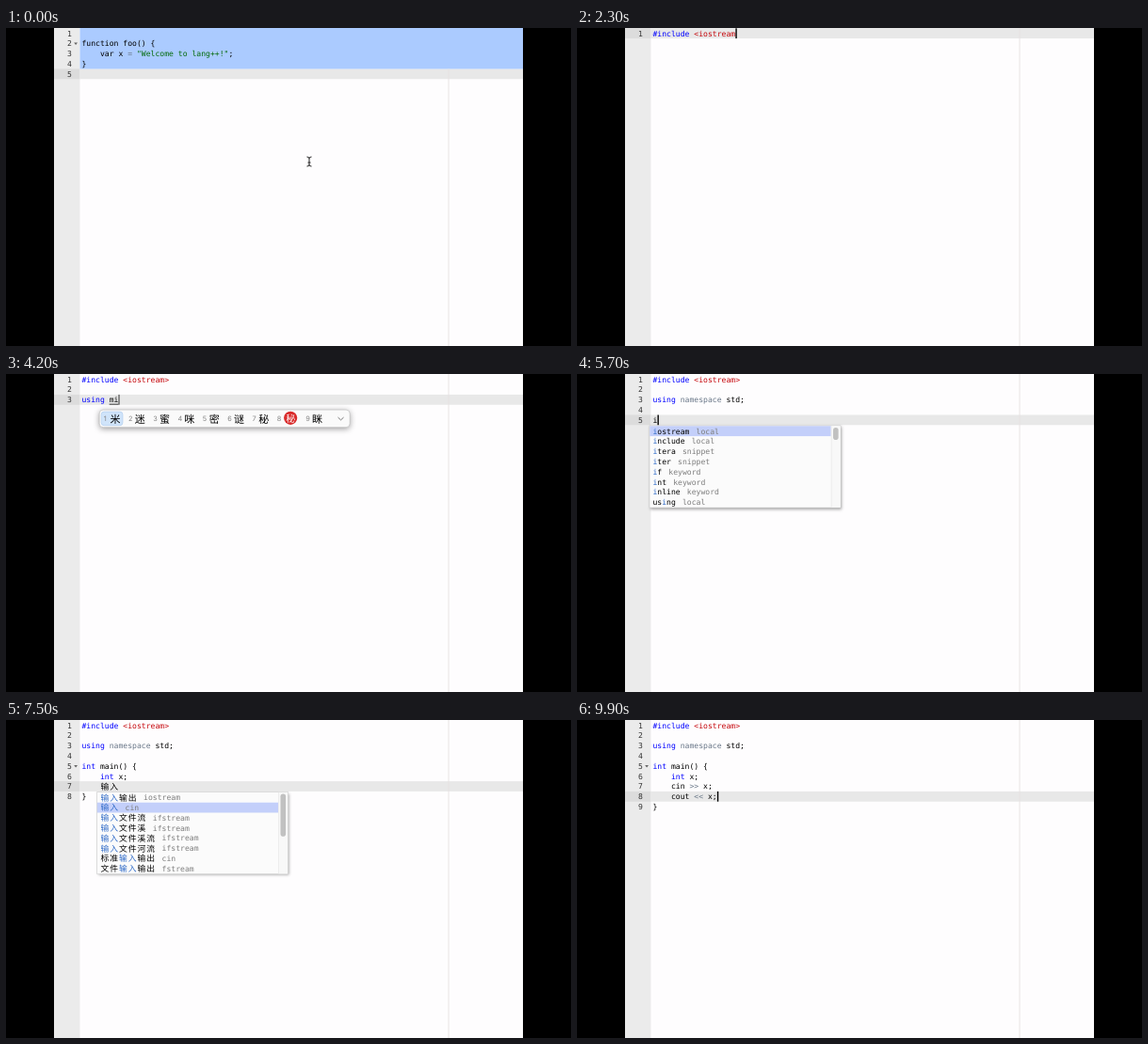
These frames come from a looping animation (600x338 px, 10 s). An HTML page with a canvas:

```html
<!DOCTYPE html>
<html lang="zh-Hans">
<head>
<meta charset="utf-8">
<style>
html, body { margin: 0; width: 100%; height: 100%; overflow: hidden; background: #000; }
canvas { display: block; }
</style>
</head>
<body>
<canvas id="stage" width="600" height="338"></canvas>
<script>
const ctx = document.getElementById('stage').getContext('2d');
const LOOP = 10000, LINE = 10.8, COL = 4.876, LEFT = 80.4, TOP = 0.3;
const MONO = '8.1px "DejaVu Sans Mono", monospace';
const cjk = size => `${size}px "Noto Sans CJK SC", "Noto Sans CJK", sans-serif`;
const BLUE = '#0000ff', GREY = '#687687';

// Later rules win where they overlap.
const syntax = [
  [/#include|\b(using|int)\b/g, BLUE],
  [/\bnamespace\b|=|>>|<</g, GREY],
  [/(?<=^#include )<[^<]*$/g, '#c5060b'],
  [/"[^"]*"/g, '#036a07'],
];

// Input method candidates by pinyin; the longest matching prefix is used.
const candidates = {
  'b': '不 吧 把 被 本 边 并 比 报',
  'bao': '包 报 抱 保 宝 爆 饱 暴 薄',
  'bao han': '包含 饱含 包 报 抱 保 宝',
  'biao zhun': '标准 表准 标注 表转 标转 表追 表尊 标追 表',
  'm': '吗 没 们 面 买 慢 每 忙 门',
  'mi': '米 迷 蜜 咪 密 谜 秘 ㊙ 眯',
  'ming': '名 明 命 鸣 铭 茗 冥 鸣 溟',
  'ming ming': '命名 明明 冥冥 名 明 命 鸣',
  's': '是 说 上 时 所 使 三 谁 水',
  'shi': '是 时 事 使 十 式 市 师 石',
  'shi yo': '使用 实用 试用 适用 是 时',
  'shu': '书 数 树 输 属 熟 叔 术 鼠',
  'shu r': '输入 数日 书 数 树 输 属',
  'shu chu': '输出 书 数 树 输 属 熟',
};

const lists = {
  include: ['包含 #include', '包含 include'],
  stream: ['输入输出 iostream', '输入文件流 ifstream', '输入文件溪 ifstream', '输入文件溪流 ifstream',
    '输入文件河流 ifstream', '标准输入输出 cstdio'],
  using: ['使用 using'],
  namespace: ['命名空间 namespace', '命名 using', '未命名 local', '重命名 rename', '命名管道 mkfifo', '类型命名 typename'],
  std: ['标准 std', '标准输出 cout', '标准输入 cin', '标准错误 cerr', '标准日志 clog', '标准输入输出 cstdio',
    '标准库 cstdlib', '标准异常 exception'],
  i: ['iostream local', 'include local', 'itera snippet', 'iter snippet', 'if keyword', 'int keyword',
    'inline keyword', 'using local'],
  input: ['输入输出 iostream', '输入 cin', '输入文件流 ifstream', '输入文件溪 ifstream', '输入文件溪流 ifstream',
    '输入文件河流 ifstream', '标准输入输出 cin', '文件输入输出 fstream'],
  output: ['输出 cout', '输出文件流 ofstream', '输出文件溪 ofstream', '输出文件溪流 ofstream',
    '输出文件河流 ofstream', '输入输出 iostream', '标准输出 cout', '控制台输出 cout'],
  x: ['x local', 'xor keyword', 'xor_eq keyword', 'extern keyword', 'explicit keyword', 'export keyword',
    'exp function', 'max function'],
};

const steps = [];
let head = '', tail = '';
const at = (t, text, extra) => steps.push({ t, head: head + text, tail, pinyin: '', ...extra });
const keep = (t, text) => { at(t, text); head += text; };
const compose = (t, typed) => typed.split('/').forEach((pinyin, i) => at(t + 100 * i, '', { pinyin }));
const suggest = (t, text, query, list, total = 8, extra) => at(t, text, { query, list: lists[list], total, ...extra });

head = '\nfunction foo() {\n    var x = "Welcome to lang++!";\n}\n';
at(0, '', { selected: true, blink: true });
head = '';
at(100, '');
compose(300, 'b/ba/bao/bao h/bao ha/bao han');
suggest(900, '包含', '包含', 'include');
keep(1200, '#include');
keep(1300, ' ');
keep(1400, '<');
compose(1500, 's/sh/shu/shu r/shu ru');
suggest(2000, '输入', '输入', 'stream');
keep(2300, 'iostream');
keep(2400, '>');
keep(2500, '\n');
keep(2600, '\n');
compose(2800, 's/sh/shi/shi y/shi yo/shi yon/shi yong');
suggest(3600, '使用', '使用', 'using');
keep(3800, 'using');
keep(3900, ' ');
compose(4100, 'm/mi/ming/ming ming');
suggest(4500, '命名', '命名', 'namespace');
keep(4700, 'namespace');
keep(4800, ' ');
compose(4900, 'b/biao zhun');
suggest(5100, '标准', '标准', 'std', 14);
keep(5200, 'std;');
keep(5400, '\n');
keep(5500, '\n');
at(5600, 'i');
suggest(5700, 'i', 'i', 'i', 52);
at(5800, 'in');
keep(5900, 'int');
keep(6000, ' ');
keep(6100, 'ma');
keep(6200, 'in');
keep(6300, '()');
tail = '}';
keep(6400, ' {');
tail = '\n}';
keep(6500, '\n    ');
suggest(6600, 'i', 'i', 'i', 52);
keep(6700, 'int x;');
keep(6800, '\n    ');
compose(7000, 's/shu/shu r/shu ru');
suggest(7400, '输入', '输入', 'input', 15);
suggest(7500, '输入', '输入', 'input', 15, { picked: 1, blink: true });
suggest(7600, '输入', '输入', 'input', 15, { picked: 1 });
keep(7700, 'cin');
keep(7800, ' >');
keep(7900, '> ');
suggest(8000, 'x', 'x', 'x', 24);
keep(8100, 'x;');
keep(8300, '\n    ');
compose(8600, 'shu/shu chu');
suggest(8800, '输出', '输出', 'output', 14);
keep(9000, 'cout');
keep(9200, ' <');
keep(9300, '< ');
suggest(9500, 'x', 'x', 'x', 24);
keep(9700, 'x;');

const rect = (x, y, w, h, color) => { ctx.fillStyle = color; ctx.fillRect(x, y, w, h); };
const isWide = ch => ch > '\u2e80';
const textWidth = s => [...s].reduce((w, ch) => w + (isWide(ch) ? 2 : 1) * COL, 0);

function drawText(text, x, cy, colorAt) {
  [...text].forEach((ch, i) => {
    const wide = isWide(ch);
    ctx.font = wide ? cjk(8.8) : MONO;
    ctx.fillStyle = colorAt(i);
    ctx.fillText(ch, x + (wide ? 0.5 : 0), cy + (wide ? 3.3 : 2.9));
    x += wide ? 2 * COL : COL;
  });
}

function roundBox(x, y, w, h, r, fill, stroke) {
  ctx.beginPath();
  ctx.roundRect(x, y, w, h, r);
  ctx.fillStyle = fill;
  ctx.fill();
  if (!stroke) return;
  ctx.shadowColor = 'transparent';
  ctx.strokeStyle = stroke;
  ctx.lineWidth = 0.6;
  ctx.stroke();
}

function withShadow(color, blur, dx, dy, draw) {
  ctx.save();
  Object.assign(ctx, { shadowColor: color, shadowBlur: blur, shadowOffsetX: dx, shadowOffsetY: dy });
  draw();
  ctx.restore();
}

function drawLine(text, row) {
  const cy = TOP + row * LINE + LINE / 2;
  const colors = Array(text.length).fill('#000');
  for (const [rule, color] of syntax)
    for (const m of text.matchAll(rule)) colors.fill(color, m.index, m.index + m[0].length);
  drawText(text, LEFT, cy, i => colors[i]);
  const number = String(row + 1);
  drawText(number, 70 - textWidth(number), cy, () => '#333');
  if (!text.endsWith('{')) return;
  ctx.fillStyle = '#666';
  ctx.beginPath();
  ctx.moveTo(72.2, cy - 0.9);
  ctx.lineTo(76, cy - 0.9);
  ctx.lineTo(74.1, cy + 1.5);
  ctx.fill();
}

function drawList({ list, query, total, picked = 0 }, textX, top) {
  const x = textX - 3.4, w = 203, h = list.length * LINE + 0.8;
  withShadow('rgba(0,0,0,.35)', 3, 1, 1.5, () => roundBox(x, top, w, h, 0, '#fbfbfb', '#c8c8c8'));
  const scrolls = total > list.length;
  const inner = scrolls ? 192.5 : w - 0.6;
  rect(x + 0.3, top + 0.4 + picked * LINE, inner, LINE, '#c3cffa');
  if (scrolls) {
    rect(x + 192.8, top + 0.4, 9.8, h - 0.8, '#f8f8f8');
    rect(x + 192.8, top + 0.4, 0.6, h - 0.8, '#e4e4e4');
    roundBox(x + 195, top + 2, 5.6, 85 * 8 / total, 2.8, '#c1c1c1');
  }
  list.forEach((item, i) => {
    const [name, meta] = item.split(' ');
    const cy = top + 0.4 + (i + 0.5) * LINE;
    const hit = name.indexOf(query);
    drawText(name, textX, cy, k => k >= hit && k < hit + query.length ? '#2d69c7' : '#000');
    drawText(meta, textX + textWidth(name) + 7.2, cy, () => '#7d7d7d');
  });
}

function drawCandidates(pinyin, x, y) {
  const key = Object.keys(candidates).filter(k => pinyin.startsWith(k)).pop();
  const words = candidates[key].split(' ');
  const itemWidth = word => word === '㊙' ? 30.4 : 15.3 + 11 * word.length;
  const w = words.reduce((sum, word) => sum + itemWidth(word), 25.2);
  withShadow('rgba(0,0,0,.4)', 6, 0, 1.5, () => roundBox(x, y, w, 18.6, 4, '#fafafa', '#b8b8b8'));
  roundBox(x + 2, y + 2, itemWidth(words[0]) - 3.5, 14.6, 3, '#d0e4fa', '#a9c9ec');
  let left = x + 4.5;
  words.forEach((word, i) => {
    ctx.font = '7.4px Inter, sans-serif';
    ctx.fillStyle = '#858585';
    ctx.fillText(i + 1, left, y + 11.9);
    if (word === '㊙') {
      ctx.fillStyle = '#d92b2b';
      ctx.beginPath();
      ctx.arc(left + 14.4, y + 8.7, 7.1, 0, 7);
      ctx.fill();
      ctx.font = cjk(10);
      ctx.fillStyle = '#fff';
      ctx.fillText('秘', left + 9.4, y + 12.4);
    } else {
      ctx.font = cjk(11);
      ctx.fillStyle = '#000';
      ctx.fillText(word, left + 6.8, y + 13.4);
    }
    left += itemWidth(word);
  });
  ctx.strokeStyle = '#777';
  ctx.lineWidth = 1;
  ctx.beginPath();
  ctx.moveTo(x + w - 12.6, y + 8);
  ctx.lineTo(x + w - 9.6, y + 10.8);
  ctx.lineTo(x + w - 6.6, y + 8);
  ctx.stroke();
}

function drawPointer(x, y) {
  ctx.strokeStyle = '#222';
  ctx.lineWidth = 1;
  ctx.beginPath();
  for (const s of [-1, 1]) {
    ctx.moveTo(x - 2.5, y + 5 * s);
    ctx.quadraticCurveTo(x, y + 5 * s, x, y + 3.5 * s);
    ctx.quadraticCurveTo(x, y + 5 * s, x + 2.5, y + 5 * s);
  }
  ctx.moveTo(x, y - 4);
  ctx.lineTo(x, y + 4);
  ctx.moveTo(x - 1.5, y + 1);
  ctx.lineTo(x + 1.5, y + 1);
  ctx.stroke();
}

function draw(step) {
  const before = step.head.split('\n');
  const row = before.length - 1, current = before[row];
  const top = TOP + row * LINE, bottom = top + LINE;
  const startX = LEFT + textWidth(current);
  const caretX = startX + textWidth(step.pinyin);

  rect(0, 0, 600, 338, '#000');
  rect(51, 0, 498, 338, '#fefdfe');
  rect(51, 0, 27.5, 338, '#ebebeb');
  const rowTop = row ? top : 0;
  rect(51, rowTop, 27.5, bottom - rowTop, '#dcdcdc');
  rect(78.5, rowTop, 470.5, bottom - rowTop, '#e8e8e8');
  if (step.selected) rect(78.5, 0, 470.5, top, '#abcbff');
  rect(469.6, step.selected ? top : 0, 0.9, 338, '#e6e1e1');

  (step.head + step.pinyin + step.tail).split('\n').forEach(drawLine);
  if (!step.blink) rect(caretX + 0.2, top, step.pinyin ? 0.8 : 1.4, LINE, '#000');
  if (step.pinyin) {
    rect(startX, bottom - 1, caretX - startX, 0.9, '#222');
    drawCandidates(step.pinyin, startX - 10.5, top + 16.2);
  }
  if (step.list) drawList(step, startX - textWidth(step.query), bottom + 0.6);
  if (step.selected) drawPointer(322, 142);
}

ctx.textRendering = 'geometricPrecision';
const start = performance.now();
function tick() {
  const t = (performance.now() - start) % LOOP;
  draw(steps.findLast(step => step.t <= t));
  requestAnimationFrame(tick);
}
tick();
</script>
</body>
</html>
```
